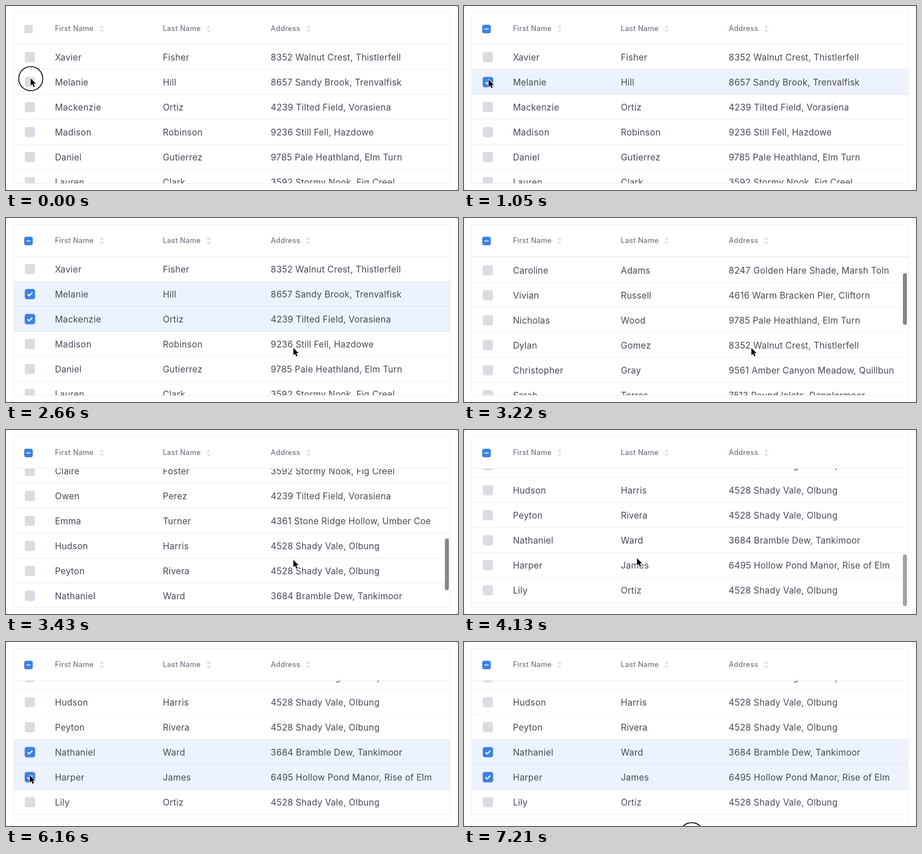
An HTML page that plays this animation: 794 px wide and 324 px high, repeating every 7280 ms.

```html
<!DOCTYPE html>
<html lang="en">
<head>
<meta charset="utf-8">
<title>Selectable table</title>
<style>
html, body { margin: 0; width: 100%; height: 100%; overflow: hidden; background: #999; }
#stage {
  position: relative; width: 794px; height: 324px; overflow: hidden;
  background: #fff; border-radius: 3px;
  font-family: Inter, "Open Sans", sans-serif; color: #444a57;
}
#stage * { position: absolute; box-sizing: border-box; white-space: nowrap; }
#table { left: 13px; top: 11px; width: 768px; height: 302px; border: 1px solid #ebedf0; }
#head {
  left: 0; top: 0; width: 766px; height: 56px; border-bottom: 1px solid #ebedf0;
  font-size: 12.5px; font-weight: 500; letter-spacing: .35px; line-height: 56px; color: #717784;
}
#view { left: 0; top: 56px; width: 766px; height: 244px; overflow: hidden; }
#rows { left: 0; top: 0; width: 766px; }
.row {
  left: 0; width: 766px; height: 44px; border-bottom: 1px solid #ebedf0;
  font-size: 15.5px; letter-spacing: .22px; line-height: 45px;
}
.row.on { background: #edf3fe; border-color: #dae3f1; }
.box { left: 19px; top: 13px; width: 18px; height: 18px; border-radius: 4px; background: #d9dce1; }
#head .box { left: 18px; top: 21px; width: 15px; height: 15px; border-radius: 3.5px; }
.box.hover { background: #c2c6d0; }
.box.done, #head .box.done { background: #3b82e2; }
.box.focus { box-shadow: 0 0 0 2px rgba(90, 100, 130, .1); }
.box svg { left: 0; top: 0; width: 100%; height: 100%; visibility: hidden; }
.box.done svg { visibility: visible; }
.sort { top: 20px; width: 10px; height: 16px; fill: #dfe2e6; }
#thumb { left: 771px; width: 7px; height: 91px; border-radius: 4px; background: #7f7f7f; }
#ring { left: 0; top: 0; width: 44px; height: 44px; margin: -22px 0 0 -22px; }
#cursor { left: 0; top: 0; width: 14.4px; height: 19.8px; margin: -1.8px 0 0 -1.8px; }
</style>
</head>
<body>
<div id="stage">
  <div id="table">
    <div id="head"></div>
    <div id="view"><div id="rows"></div></div>
  </div>
  <div id="thumb"></div>
  <svg id="ring" viewBox="0 0 44 44"><circle cx="22" cy="22" r="21.2" fill="none" stroke="#000" stroke-width="1.6"/></svg>
  <svg id="cursor" viewBox="-2 -2 16 22">
    <path d="M0 0V14.2L3.2 11.2L5.6 16.6L8 15.5L5.7 10.3H10.2Z" fill="#000" stroke="#fff" stroke-width="1.8" paint-order="stroke" stroke-linejoin="round"/>
  </svg>
</div>
<script>
const LOOP = 7280, STEP = 70, ROW = 44;
const $ = id => document.getElementById(id);

const people = [
  ["Xavier", "Fisher", "8352 Walnut Crest, Thistlerfell"],
  ["Melanie", "Hill", "8657 Sandy Brook, Trenvalfisk"],
  ["Mackenzie", "Ortiz", "4239 Tilted Field, Vorasiena"],
  ["Madison", "Robinson", "9236 Still Fell, Hazdowe"],
  ["Daniel", "Gutierrez", "9785 Pale Heathland, Elm Turn"],
  ["Lauren", "Clark", "3592 Stormy Nook, Fig Creel"],
  ["Caroline", "Adams", "8247 Golden Hare Shade, Marsh Toln"],
  ["Vivian", "Russell", "4616 Warm Bracken Pier, Cliftorn"],
  ["Nicholas", "Wood", "9785 Pale Heathland, Elm Turn"],
  ["Dylan", "Gomez", "8352 Walnut Crest, Thistlerfell"],
  ["Christopher", "Gray", "9561 Amber Canyon Meadow, Quillbun"],
  ["Sarah", "Torres", "7513 Round Inlets, Dapplermoor"],
  ["Aaron", "Reed", "9236 Still Fell, Hazdowe"],
  ["Claire", "Foster", "3592 Stormy Nook, Fig Creel"],
  ["Owen", "Perez", "4239 Tilted Field, Vorasiena"],
  ["Emma", "Turner", "4361 Stone Ridge Hollow, Umber Coe"],
  ["Hudson", "Harris", "4528 Shady Vale, Olbung"],
  ["Peyton", "Rivera", "4528 Shady Vale, Olbung"],
  ["Nathaniel", "Ward", "3684 Bramble Dew, Tankimoor"],
  ["Harper", "James", "6495 Hollow Pond Manor, Rise of Elm"],
  ["Lily", "Ortiz", "4528 Shady Vale, Olbung"]
];

const cells = list => list.map((s, i) =>
  `<span style="left:${71.9 + i * 189.6}px">${s}</span>`).join("");
const box = path => `<div class="box"><svg viewBox="0 0 18 18" fill="none" stroke="#fff" stroke-width="2"><path d="${path}"/></svg></div>`;

$("head").innerHTML = box("M4.5 9H13.5") + cells(["First Name", "Last Name", "Address"]) +
  [149, 337, 512].map(x => `<svg class="sort" style="left:${x}px" viewBox="0 0 10 16"><path d="M.8 6.4L5 1.4L9.2 6.4ZM.8 9.4H9.2L5 14.4Z"/></svg>`).join("");
$("rows").innerHTML = people.map((p, i) =>
  `<div class="row" style="top:${i * ROW}px">${box("M4.8 9.2L7.8 12L13.3 6.3")}${cells(p)}</div>`).join("");

const rows = [...document.querySelectorAll(".row")];
const boxes = rows.map(r => r.firstChild);
const headBox = $("head").firstChild;

// [time, x, y, linear arrival]
const path = [
  [0, 43.5, 127.7], [980, 43.5, 127.7], [1540, 42.5, 177], [2100, 42.5, 177],
  [2590, 505, 229], [3870, 505, 229], [4130, 304, 226, 1], [4480, 106, 203],
  [4690, 106, 203], [5180, 38, 184], [5320, 40, 184], [5460, 40, 184],
  [5880, 42, 235], [6160, 42, 235], [6790, 400, 339], [LOOP, 400, 339]
];
const scroll = [[0, 0], [2660, 0], [2870, 40], [3220, 262], [3430, 590], [3570, 688], [LOOP, 688]];
const fade = [[0, 0], [2660, 0], [2730, .95], [3920, .95], [4060, .9], [4130, .72], [4340, 0], [LOOP, 0]];
const picks = [[1, 700], [2, 2030], [18, 5320], [19, 6020]];
const presses = [[0, 140], [1890, 2030], [5180, 5320], [5950, 6020], [7140, LOOP]];

function at(keys, t, smooth) {
  const i = keys.findIndex((k, n) => n && t <= k[0]);
  const a = keys[i - 1], b = keys[i];
  let u = (t - a[0]) / (b[0] - a[0]);
  if (smooth && !b[3]) u = u * u * (3 - 2 * u);
  return [1, 2].map(n => a[n] + (b[n] - a[n]) * u);
}

function draw(now) {
  const t = Math.floor(now % LOOP / STEP) * STEP;
  const [x, y] = at(path, t, true);
  const top = Math.round(at(scroll, t)[0]);

  $("rows").style.transform = `translateY(${-top}px)`;
  $("thumb").style.top = 22 + top * .2863 + "px";
  $("thumb").style.opacity = at(fade, t)[0];
  $("cursor").style.transform = `translate(${x}px,${y}px)`;
  $("ring").style.transform = `translate(${x}px,${y + .3}px)`;
  $("ring").style.visibility = presses.some(([a, b]) => t >= a && t < b) ? "visible" : "hidden";

  rows.forEach((row, i) => {
    const pick = picks.find(p => p[0] === i);
    const age = pick ? t - pick[1] : -1;
    const boxTop = 81 + i * ROW - top;
    const over = x >= 33 && x <= 51 && y >= boxTop - 2 && y <= boxTop + 18;
    row.classList.toggle("on", age >= 0);
    boxes[i].classList.toggle("done", age >= STEP);
    boxes[i].classList.toggle("hover", t >= 140 && over);
    boxes[i].classList.toggle("focus", age >= STEP && age < 1200);
  });
  headBox.classList.toggle("done", t >= picks[0][1] + STEP);
}

const start = performance.now();
(function tick() {
  draw(performance.now() - start);
  requestAnimationFrame(tick);
})();
</script>
</body>
</html>
```
